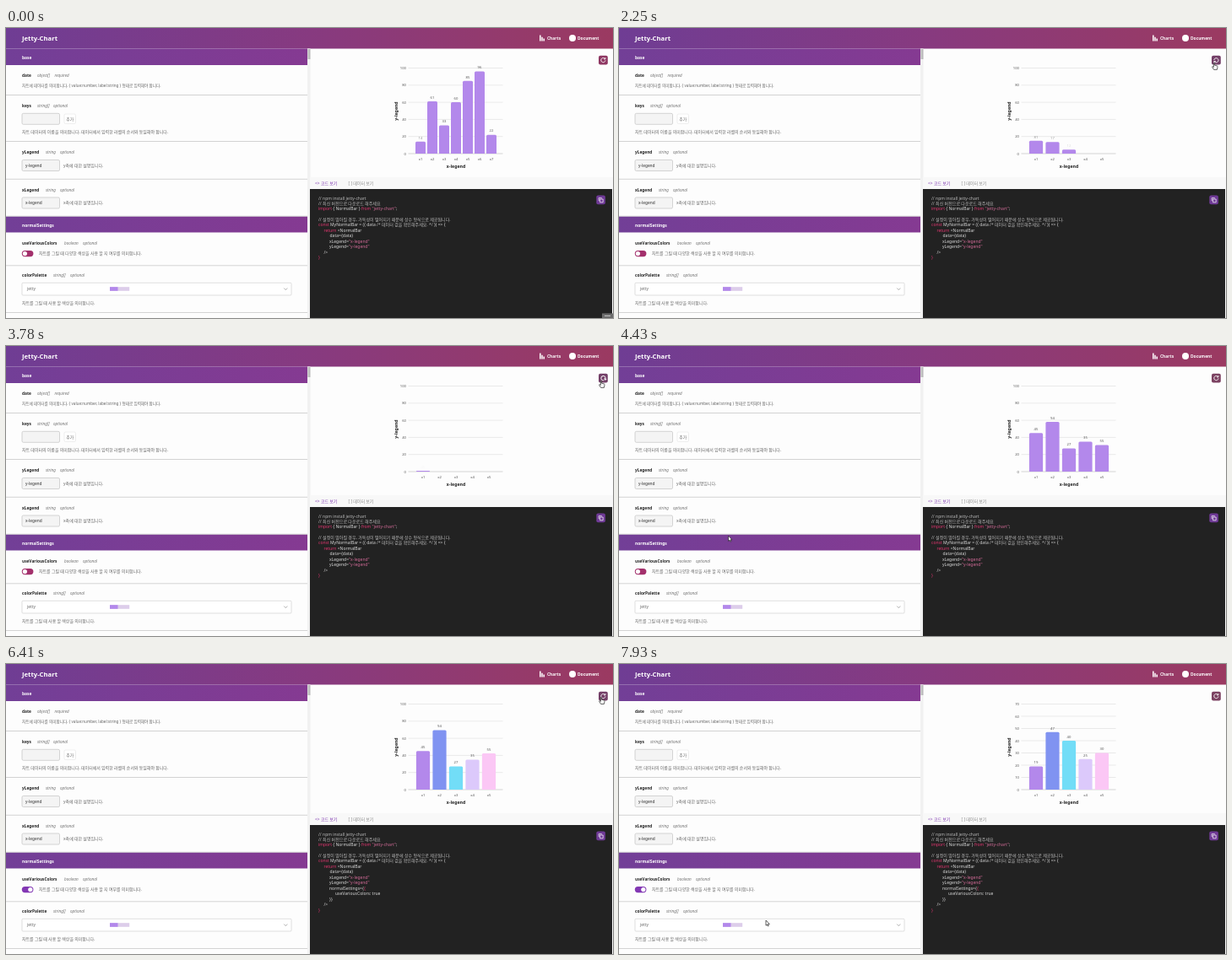
An HTML page that plays this animation: 719x344 px, repeating every 8 s.

```html
<!DOCTYPE html>
<html lang="ko">
<head>
<meta charset="utf-8">
<title>Jetty-Chart</title>
<style>
html, body { margin: 0; width: 100%; height: 100%; overflow: hidden; background: #fdfdfd; }
svg { display: block; width: 719px; height: 344px; font-family: "Noto Sans", "Noto Sans CJK KR", "Noto Sans CJK", sans-serif; }
text { white-space: pre; }
.name { font-size: 4.8px; font-weight: 700; fill: #222; }
.type { font-size: 4.6px; font-style: italic; fill: #707070; }
.desc { font-size: 4.95px; fill: #666; }
.white { font-size: 4.9px; font-weight: 700; fill: #fff; }
.val { font-size: 4.8px; fill: #333; }
.axis { font-size: 4.2px; fill: #555; }
.legend { font-size: 5.2px; font-weight: 600; fill: #222; text-anchor: middle; }
.code { font-size: 5.03px; fill: #ddd; }
</style>
</head>
<body>
<svg id="stage" viewBox="0 0 719 344"></svg>
<script>
const LOOP = 8000, BASE = 149, PLOT = 101.5;
const RATE = 0.0915;   // bar growth, px per ms
const STAGGER = 100;
const TOGGLE_AT = 5440, CODE_AT = 5560;
const PURPLE = ['#b388eb'];
const MIXED = ['#b388eb', '#8093f1', '#72ddf7', '#dcc9fb', '#fbc7f5'];

// Each run redraws the chart from zero at time `at`.
const runs = [
  { at: -5000, max: 100, step: 20, data: [14, 61, 33, 60, 85, 96, 22], fill: PURPLE },
  { at: 1450, max: 100, step: 20, data: [52, 34, 76, 25, 63], fill: PURPLE },
  { at: 2000, max: 100, step: 20, data: [81, 17, 12, 67, 56], fill: PURPLE },
  { at: 3170, max: 100, step: 20, data: [62, 29, 71, 48, 37], fill: PURPLE },
  { at: 3686, max: 100, step: 20, data: [45, 94, 27, 35, 55], fill: PURPLE },
  { at: 5540, max: 100, step: 20, data: [45, 94, 27, 35, 55], fill: MIXED },
  { at: 6900, max: 70, step: 10, data: [19, 47, 40, 25, 30], fill: MIXED }
];

const path = [
  [0, 712, 340], [70, 690, 338], [400, 272, 283], [650, 40, 268], [870, 72, 254],
  [1060, 682, 164], [1400, 705, 41], [3970, 705, 41], [4250, 289, 231], [4430, 130, 225],
  [4700, 28, 266], [5700, 28, 266], [5980, 400, 180], [6200, 708, 102], [6320, 708, 16],
  [6390, 705, 39], [7050, 705, 41], [7400, 560, 195], [7900, 174, 304], [8000, 174, 304]
];

const esc = s => s.replace(/&/g, '&amp;').replace(/</g, '&lt;');
const text = (x, y, cls, s, more = '') => `<text x="${x}" y="${y}" class="${cls}" ${more}>${esc(s)}</text>`;
const rect = (x, y, w, h, fill, more = '') => `<rect x="${x}" y="${y}" width="${w}" height="${h}" fill="${fill}" ${more}/>`;
const line = (x1, y1, x2, y2, stroke, w = 0.6) => `<path d="M${x1} ${y1}L${x2} ${y2}" stroke="${stroke}" stroke-width="${w}"/>`;
const clamp = v => Math.max(0, Math.min(1, v));

const heading = (y, name, type, tx, need, nx) =>
  text(19, y, 'name', name) + text(tx, y, 'type', type) + text(nx, y, 'type', need);
const field = (y, value) =>
  rect(19, y, 44.5, 13, '#f4f4f4', 'rx="1.5" stroke="#bbb" stroke-width=".6"') + text(23, y + 8.2, 'val', value);

// A code line is a list of [colour, string] parts.
const codeLine = (x, y, ...parts) => `<text x="${x}" y="${y}" class="code">` +
  parts.map(([c, s]) => `<tspan fill="${c}">${esc(s)}</tspan>`).join('') + '</text>';

const RED = '#e0356f', GREY = '#b8b8b8', LIGHT = '#d8d8d8', PINK = '#d06a96';

function header() {
  return rect(0, 0, 719, 24.5, 'url(#top)') +
    text(19, 14.6, 'white', 'Jetty-Chart', 'style="font-size:7.7px"') +
    '<path d="M632.8 8.5V15.5M635 10.8V15.5M637.2 12.6V15.5" stroke="#fff" stroke-width="1.5"/>' +
    text(641, 13.8, 'white', 'Charts') +
    '<circle cx="671" cy="12" r="4" fill="#fff"/>' +
    text(677, 13.8, 'white', 'Document');
}

function settings() {
  return rect(0, 24.5, 357, 19.5, 'url(#bar)') + text(19, 36.8, 'white', 'base') +
    heading(58.3, 'date', 'object[]', 37, 'required', 57.5) +
    text(19, 69.6, 'desc', '차트에 데이터를 의미합니다. { value:number, label:string } 형태로 입력해야 합니다.', 'style="font-size:4.6px"') +
    heading(94, 'keys', 'string[]', 37, 'optional', 56) + field(101.3, '') +
    rect(69, 102, 13.5, 11.5, '#fff', 'rx="1.5" stroke="#ddd" stroke-width=".5"') +
    text(71.3, 109.5, 'desc', '추가', 'style="font-size:4.8px"') +
    text(19, 125.2, 'desc', '차트 데이터의 이름을 의미합니다. 데이터에서 입력한 라벨의 순서와 동일해야 합니다.') +
    heading(149.2, 'yLegend', 'string', 47, 'optional', 64) + field(156.5, 'y-legend') +
    text(68, 164.7, 'desc', 'y축에 대한 설명입니다.') +
    heading(193.8, 'xLegend', 'string', 47, 'optional', 64) + field(201, 'x-legend') +
    text(68, 209.3, 'desc', 'x축에 대한 설명입니다.') +
    rect(0, 223.5, 357, 19, 'url(#bar)') + text(19, 235.6, 'white', 'normalSettings') +
    heading(256.6, 'useVariousColors', 'boolean', 69, 'optional', 91) +
    rect(18.8, 264, 13.6, 7.2, '#a3306c', 'rx="3.6" id="track"') +
    '<circle id="knob" cy="267.6" r="2.6" fill="#fff"/>' +
    text(39, 269.4, 'desc', '차트를 그릴 때 다양한 색상을 사용 할 지 여부를 의미합니다.') +
    heading(295, 'colorPalette', 'string[]', 56, 'optional', 76) +
    rect(19, 302.3, 319, 14.7, '#fff', 'rx="1" stroke="#ccc" stroke-width=".6"') +
    text(25, 311.4, 'val', 'jetty', 'style="fill:#666"') +
    rect(123, 307.2, 23.2, 4.6, '#dccdea') + rect(123, 307.2, 9.5, 4.6, '#b388eb') +
    '<path d="M329.3 308.6l2 2 2-2" fill="none" stroke="#888" stroke-width=".7"/>' +
    text(19, 327.6, 'desc', '차트를 그릴 때 사용 할 색상을 의미합니다.') +
    [79.5, 134.5, 179.3, 223.2, 281.8, 337.5].map(y => line(0, y, 357, y, '#c9c9c9', 0.8)).join('') +
    rect(357, 24.5, 3.5, 319.5, '#f1f1f1') + rect(357.5, 25, 3, 12, '#bdbdbd');
}

function code() {
  const legend = (y, k) => codeLine(383, y, [LIGHT, k + 'Legend='], [PINK, `"${k}-legend"`]);
  return rect(360, 177, 359, 14, '#f8f8f8') +
    text(366, 185.8, 'desc', '<> 코드 보기', 'style="fill:#7d35b0;font-weight:500"') +
    text(405.5, 185.8, 'desc', '[ ] 데이터 보기', 'style="fill:#888"') +
    rect(360, 191, 358, 153, '#222') +
    codeLine(370, 203.6, [GREY, '// npm install jetty-chart']) +
    codeLine(370, 210, [GREY, '// 최신 버전으로 다운로드 해주세요']) +
    codeLine(370, 216.2, [RED, 'import'], [LIGHT, ' { NormalBar } '], [RED, 'from'], [PINK, ' "jetty-chart"'], [LIGHT, ';']) +
    codeLine(370, 229, [GREY, '// 설정이 많아질 경우, 가독성이 떨어지기 때문에 상수 형식으로 제공됩니다.']) +
    codeLine(370, 235.4, [RED, 'const'], [LIGHT, ' MyNormalBar = ({ data '], [GREY, '/* 데이터 값을 확인해주세요. */'], [LIGHT, ' }) => {']) +
    codeLine(376.5, 241.8, [RED, 'return'], [LIGHT, ' <NormalBar']) +
    codeLine(383.5, 248.2, [LIGHT, 'data={data}']) +
    legend(254.8, 'x') + legend(261.2, 'y') +
    '<g id="plain">' + codeLine(376.5, 267.6, [LIGHT, '/>']) + codeLine(370, 274.2, [RED, '}']) + '</g>' +
    '<g id="extra">' +
    codeLine(383, 267.6, [LIGHT, 'normalSettings={'], [RED, '{']) +
    codeLine(390, 274.2, [LIGHT, 'useVariousColors: true']) +
    codeLine(383, 280.6, [LIGHT, '}}']) + codeLine(376.5, 287, [LIGHT, '/>']) + codeLine(370, 293.6, [RED, '}']) + '</g>' +
    rect(699.3, 198.6, 10.6, 10.6, '#6f3a96', 'rx="2"') +
    '<path d="M703.6 203h3.6v3.8h-3.6zM702.2 205.2v-3.6h3.6" fill="none" stroke="#fff" stroke-width=".7"/>';
}

document.getElementById('stage').innerHTML = `
  <defs>
    <linearGradient id="top"><stop stop-color="#6f3d94"/><stop offset=".5" stop-color="#873a80"/><stop offset="1" stop-color="#9b3a61"/></linearGradient>
    <linearGradient id="bar"><stop stop-color="#723f97"/><stop offset="1" stop-color="#853a92"/></linearGradient>
  </defs>` +
  rect(0, 0, 719, 344, '#fdfdfd') + header() + settings() + '<g id="chart"></g>' +
  text(533, 165.8, 'legend', 'x-legend') +
  text(0, 0, 'legend', 'y-legend', 'transform="translate(463.8 98.5) rotate(-90)"') +
  rect(702, 32.7, 10.8, 10.8, '#8f3863', 'rx="2" id="button"') +
  '<path id="reload" d="M709.4 36.4A2.6 2.6 0 1 0 710 38.4M709.9 35v1.9h-1.9" fill="none" stroke="#fff" stroke-width=".9"/>' +
  code() +
  '<g id="corner">' + rect(706, 338.5, 13, 5.5, '#6b6b6b') + line(709, 341.5, 716, 341.5, '#ccc', 0.9) + '</g>' +
  `<g id="cursor" stroke="#222" stroke-width=".7" fill="#fff" stroke-linejoin="round">
    <path id="arrow" d="M0 0V6.2L1.4 5 2.3 7 3.3 6.5 2.4 4.6H4.3Z"/>
    <path id="hand" d="M-.6 .6Q0-.4 .6 .6V3.2L3.6 4Q4.2 4.2 4 5.2L3.4 8.4H-.4L-2.4 5.2Q-2.3 4.2-1.4 4.8L-.6 5.4Z"/>
  </g>`;

const el = id => document.getElementById(id);
const show = (id, on) => el(id).setAttribute('display', on ? 'inline' : 'none');

function chart(run, t) {
  const n = run.data.length, slot = n === 7 ? 14 : 19.5, width = n === 7 ? 12 : 16.2;
  let out = '';
  for (let v = 0; v <= run.max; v += run.step) {
    const y = BASE - v / run.max * PLOT;
    out += line(476.5, y, 588.5, y, v ? '#dcdcdc' : '#bbb') +
      text(474, y + 1.5, 'axis', String(v), 'text-anchor="end"');
  }
  run.data.forEach((v, i) => {
    const x = 533 + (i - (n - 1) / 2) * slot, age = t - run.at - (i ? i * STAGGER : 85);
    const h = Math.max(0, Math.min(v / run.max * PLOT, age * RATE));
    const top = BASE - h, r = Math.min(1.5, h), l = x - width / 2;
    out += text(x, 156.6, 'axis', 'x' + (i + 1), 'text-anchor="middle"');
    if (!h) return;
    out += `<path d="M${l} ${BASE}V${top + r}q0 ${-r} ${r} ${-r}h${width - 2 * r}q${r} 0 ${r} ${r}V${BASE}z" fill="${run.fill[i % run.fill.length]}"/>` +
      text(x, top - 3.2, 'axis', String(v), `text-anchor="middle" opacity="${clamp(h / 25)}"`);
  });
  return out;
}

function cursorAt(t) {
  const i = path.findIndex(p => p[0] > t), a = path[i - 1], b = path[i];
  const k = (t - a[0]) / (b[0] - a[0]);
  return [a[1] + (b[1] - a[1]) * k, a[2] + (b[2] - a[2]) * k];
}

function render(t) {
  const run = runs.filter(r => r.at <= t).pop();
  el('chart').innerHTML = chart(run, t);

  const on = clamp((t - TOGGLE_AT) / 180);
  el('knob').setAttribute('cx', 22.4 + 6.4 * on);
  el('track').setAttribute('fill', on > 0.5 ? '#8338b4' : '#a3306c');
  show('plain', t < CODE_AT);
  show('extra', t >= CODE_AT);
  show('corner', t < 70);

  const [x, y] = cursorAt(t);
  const onReload = x > 701 && y > 32 && y < 45;
  const hand = onReload || (x < 36 && y > 262);
  show('cursor', t >= 70);
  show('hand', hand);
  show('arrow', !hand);
  el('cursor').setAttribute('transform', `translate(${x} ${y})`);
  el('button').setAttribute('fill', t < 1400 ? '#8f3863' : onReload ? '#744068' : '#7c4262');
  const spin = run.fill === MIXED && run.max === 100 ? 1 : clamp((t - run.at) / 500);
  el('reload').setAttribute('transform', `rotate(${360 * spin} 707.4 38.2)`);
}

const start = performance.now();
function tick() {
  render((performance.now() - start) % LOOP);
  requestAnimationFrame(tick);
}
tick();
</script>
</body>
</html>
```
